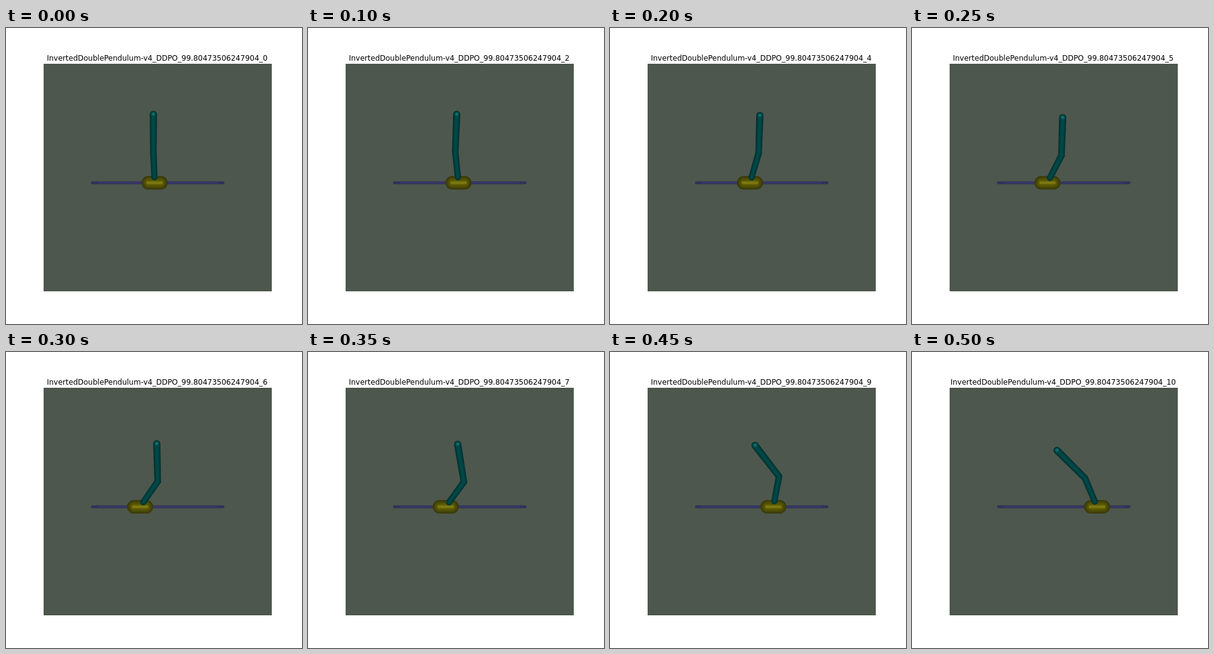
Write an HTML page with a canvas that moves like this. It is 480 by 480 pixels and loops after 0.55 s.

```html
<!DOCTYPE html>
<html>
<head>
<meta charset="utf-8">
<style>
  html, body { margin: 0; width: 100%; height: 100%; overflow: hidden; background: #fff; }
  canvas { display: block; }
</style>
</head>
<body>
<canvas id="stage" width="480" height="480"></canvas>
<script>
const ctx = document.getElementById('stage').getContext('2d');
const STEP = 50, STEPS = 11, RAIL_Y = 251, LAYERS = 6;

// Key x positions, two steps apart
const cartKeys = [241, 244, 227, 217.5, 239, 300];
const jointKeys = [239, 238.8, 241, 246, 263, 280.7];
const tipKeys = [239, 241.2, 243, 244.5, 239, 235.2];

// Smooth polynomial through evenly spaced keys (Neville's scheme)
function curve(keys, t, first = 0, last = keys.length - 1) {
  if (first === last) return keys[first];
  const left = curve(keys, t, first, last - 1), right = curve(keys, t, first + 1, last);
  return left + (right - left) * (t - first) / (last - first);
}

const rise = (length, dx) => Math.sqrt(length * length - dx * dx);

function capsule({ x1, y1, r1, x2, y2, r2 = r1 }, scale) {
  const a = Math.atan2(y2 - y1, x2 - x1), quarter = Math.PI / 2;
  ctx.beginPath();
  ctx.arc(x1, y1, r1 * scale, a + quarter, a - quarter);
  ctx.arc(x2, y2, r2 * scale, a - quarter, a + quarter);
  ctx.fill();
}

// Nested capsules from dark rim to light core; joined parts share each layer
function shade(parts, dark, light) {
  for (let i = 0; i < LAYERS; i++) {
    const k = i / (LAYERS - 1);
    ctx.fillStyle = `rgb(${dark.map((c, j) => c + (light[j] - c) * k)})`;
    for (const part of parts) capsule(part, 1 - 0.8 * k);
  }
}

function drawRail() {
  shade([{ x1: 140, y1: RAIL_Y, r1: 2.2, x2: 352, y2: RAIL_Y }], [43, 43, 76], [61, 59, 114]);
  ctx.fillStyle = '#2d2c52';
  for (const x of [140, 343]) ctx.fillRect(x, 250.5, 9, 1);
}

function drawCart(x) {
  shade([{ x1: x - 10.2, y1: RAIL_Y, r1: 11, x2: x + 10.2, y2: RAIL_Y }], [58, 58, 12], [104, 102, 0]);
  ctx.fillStyle = '#7b7812';
  ctx.fillRect(x - 13, 249, 26, 4);
}

function drawPole(cart, joint, tip) {
  const dx = joint - cart, lean = tip - joint;
  const up = rise(50, dx), jointY = RAIL_Y - up;
  const tipY = jointY - rise(61 + 0.07 * Math.abs(lean), lean);
  shade([
    { x1: cart + dx * 0.18, y1: RAIL_Y - up * 0.18, r1: 5, x2: joint, y2: jointY, r2: 5.3 },
    { x1: joint, y1: jointY, r1: 5.3, x2: tip, y2: tipY, r2: 5.9 }
  ], [3, 50, 49], [0, 75, 74]);
  shade([{ x1: tip, y1: tipY - 0.5, r1: 3.6, x2: tip, y2: tipY - 0.4 }], [0, 78, 76], [32, 120, 117]);
}

function draw() {
  const step = Math.floor(performance.now() / STEP) % STEPS;
  const [cart, joint, tip] = [cartKeys, jointKeys, tipKeys].map(keys => curve(keys, step / 2));
  ctx.fillStyle = '#fff';
  ctx.fillRect(0, 0, 480, 480);
  ctx.fillStyle = '#4d574d';
  ctx.fillRect(61, 58, 370, 369);
  ctx.fillStyle = '#000';
  ctx.font = '12px "DejaVu Sans", sans-serif';
  ctx.textAlign = 'center';
  ctx.fillText('InvertedDoublePendulum-v4_DDPO_99.80473506247904_' + step, 245.2, 53);
  drawRail();
  drawCart(cart);
  drawPole(cart, joint, tip);
  requestAnimationFrame(draw);
}
draw();
</script>
</body>
</html>
```
